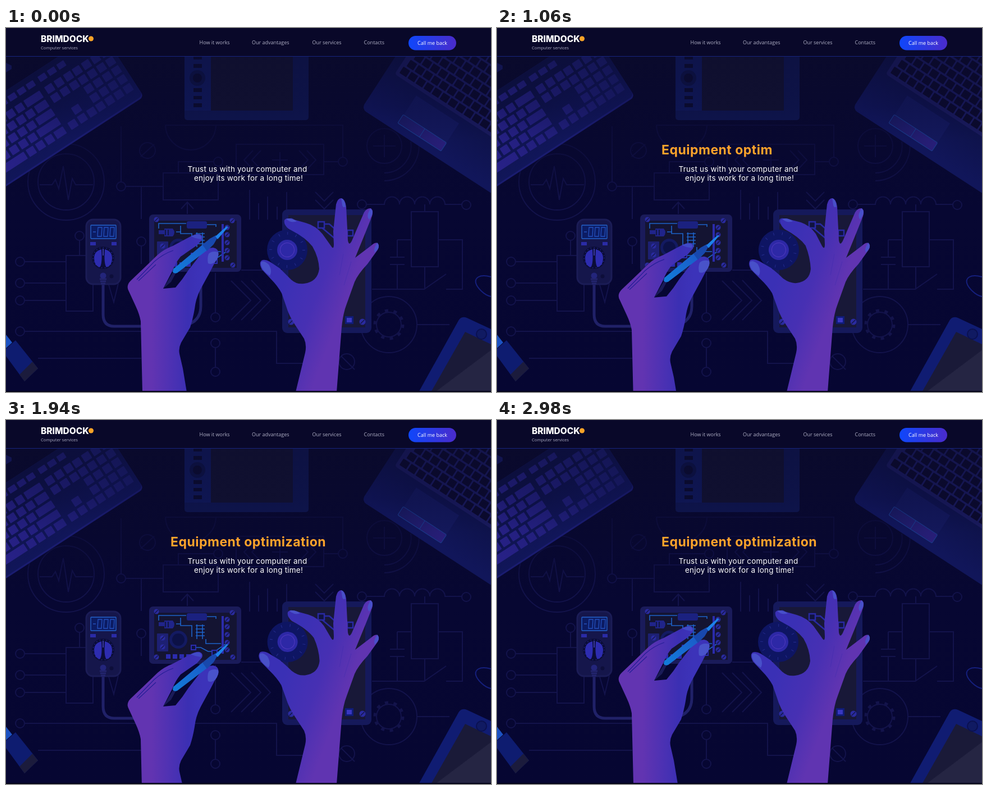
These frames come from a looping animation (864 px wide and 648 px high, 3 s). An HTML page:

```html
<!DOCTYPE html>
<html lang="en">
<head>
<meta charset="utf-8">
<title>Computer services</title>
<style>
html, body { margin: 0; width: 100%; height: 100%; overflow: hidden; background: #060632; }
svg { display: block; width: 864px; height: 648px; }
.nav { font: 9px "Open Sans", sans-serif; fill: #aeaec4; }
.head { font-family: Montserrat, Inter, sans-serif; fill: #fff; }
.line { fill: none; stroke: #13134b; stroke-width: 2; }
.wire { fill: none; stroke: #1d62c8; stroke-width: 1.6; }
</style>
</head>
<body>
<svg viewBox="0 0 864 648">
<defs>
  <linearGradient id="bg" x2="0" y2="1"><stop stop-color="#0a0a2c"/><stop offset=".5" stop-color="#070732"/><stop offset="1" stop-color="#060632"/></linearGradient>
  <linearGradient id="shade" x2="0" y2="1"><stop stop-color="#0a0a2c" stop-opacity=".85"/><stop offset=".6" stop-color="#08082f" stop-opacity=".55"/><stop offset="1" stop-color="#070732" stop-opacity="0"/></linearGradient>
  <linearGradient id="keys" gradientUnits="userSpaceOnUse" x1="0" y1="0" x2="-290" y2="0"><stop stop-color="#191c69"/><stop offset="1" stop-color="#282188"/></linearGradient>
  <linearGradient id="body" gradientUnits="userSpaceOnUse" x1="0" y1="-110" x2="0" y2="0"><stop stop-color="#0d1144"/><stop offset="1" stop-color="#11165a"/></linearGradient>
  <linearGradient id="bar"><stop stop-color="#191a60"/><stop offset="1" stop-color="#281e78"/></linearGradient>
  <linearGradient id="call"><stop stop-color="#0f47fb"/><stop offset="1" stop-color="#4a2bcb"/></linearGradient>
  <linearGradient id="skinL" gradientUnits="userSpaceOnUse" x1="220" y1="0" x2="350" y2="0"><stop offset=".3" stop-color="#6234b1"/><stop offset=".58" stop-color="#4c31b3"/><stop offset=".8" stop-color="#3b2fb3"/><stop offset="1" stop-color="#3c33b9"/></linearGradient>
  <linearGradient id="skinR" gradientUnits="userSpaceOnUse" x1="505" y1="425" x2="612" y2="465"><stop stop-color="#3a30b5"/><stop offset=".55" stop-color="#4730b3"/><stop offset="1" stop-color="#6034b1"/></linearGradient>
  <linearGradient id="pen" gradientUnits="userSpaceOnUse" x1="300" y1="433" x2="360" y2="385"><stop stop-color="#127bd9"/><stop offset="1" stop-color="#1b5ac8"/></linearGradient>
</defs>

<rect width="864" height="648" fill="url(#bg)"/>

<!-- circuit drawing -->
<g class="line">
  <circle cx="107" cy="274" r="68"/><circle cx="107" cy="274" r="50"/>
  <path d="M60 279H82L88 270 94 286 102 246 111 306 118 268 124 279H155"/>
  <path d="M205 274V175M213 282H280M241 283V340M241 388V420M280 258H378V306H280ZM307 258V238H370M241 218H242M240 229L264 207"/>
  <path d="M284 172A45 45 0 0 0 374 172M283 173H600V230M410 207H566V261H410ZM566 238H592"/>
  <path d="M440 218L424 235 440 252M454 218L438 235 454 252M522 218L538 235 522 252M536 218L552 235 536 252M474 235H502M488 221V249"/>
  <path d="M654 210H694M674 190V230M674 272A62 62 0 0 0 735 200M674 258A48 48 0 0 0 721 202"/>
  <path d="M33 416H107M33 454H107M33 485H107M131 378V405M107 405H155V504H107ZM178 440L192 488 200 455"/>
  <path d="M33 540H482V597H593M57 588H241M373 507V436M373 569V604M597 584L621 608M419 431H492"/>
  <path d="M401 450L436 485 401 520M419 450L454 485 419 520M437 449L471 485 437 520"/>
  <path d="M434 288V341M450 312V341M466 300V341M483 318V341M500 292V325M323 331V310M312 322L323 310 334 322"/>
  <path d="M551 292L567 308 583 292M551 306L567 322 583 306"/>
  <path d="M642 314H674a13 13 0 0 1 27 0a13 13 0 0 1 27 0a13 13 0 0 1 27 0a13 13 0 0 1 27 0H812"/>
  <path d="M722 327H770V425H722ZM746 314V327M746 425V465M684 408H710M684 421H710M697 377V408M697 421V465M697 377H722M652 465H745L784 438M784 465H813V377H770M732 528H790"/>
  <circle cx="682" cy="528" r="50"/><circle cx="682" cy="528" r="22"/>
  <circle cx="682" cy="528" r="25" stroke-width="5" stroke-dasharray="6 9.7"/>
  <g id="nodes"></g>
</g>
<rect y="50" width="864" height="270" fill="url(#shade)"/>
<path d="M864 443C842 437 835 446 837 454S852 476 864 478" fill="none" stroke="#151f7c" stroke-width="2"/>

<!-- keyboard -->
<path d="M0 62L10 67 10 73 0 79Z" fill="#15195f"/>
<g transform="translate(244 120) rotate(-33)">
  <rect x="-500" y="-140" width="500" height="143" rx="8" fill="#1a1c70"/>
  <rect x="-500" y="-140" width="500" height="140" rx="8" fill="url(#body)"/>
  <g id="keyboard" fill="url(#keys)"></g>
</g>

<!-- laptop -->
<g transform="translate(637 138) rotate(33)">
  <rect y="-240" width="420" height="247" rx="10" fill="url(#body)"/>
  <rect x="16" y="-250" width="380" height="173" rx="5" fill="#191a5c"/>
  <rect x="69" y="-66" width="91" height="41" fill="#13185a"/>
  <rect x="68" y="-25" width="92" height="18" rx="2" fill="url(#bar)" stroke="#193b8a"/>
  <path d="M114 -25V-7" stroke="#193b8a"/>
  <g id="laptop" fill="#0b0a2c"></g>
</g>

<!-- tablet -->
<rect x="318" y="40" width="221" height="124" rx="5" fill="#0f164e"/>
<rect x="318" y="40" width="47" height="107" fill="#10195a"/>
<rect x="365" y="40" width="146" height="107" fill="#121230"/>
<circle cx="341" cy="89" r="14" fill="#0d1345"/><circle cx="341" cy="89" r="8" fill="#0b0c30"/>
<path d="M334 50h15v6h-15zm0 14h15v7h-15zm0 43h15v7h-15zm0 14h15v6h-15zm0 13h15v7h-15z" fill="#0b0c2e"/>
<rect y="50" width="864" height="150" fill="url(#shade)" opacity=".4"/>

<!-- phone and memory stick -->
<path d="M733 652L806 521Q811 512 821 516L866 537V652Z" fill="#101c72"/>
<path d="M756 650L818 541 866 564V650Z" fill="#1a1a38"/>
<path d="M762 650L866 572V650Z" fill="#252543"/>
<circle cx="847" cy="545" r="9" fill="#101a62" stroke="#0b1150" stroke-width="2"/>
<path d="M0 546L11 560 0 570Z" fill="#1c52c2"/>
<path d="M0 571L17 556 57 606 33 629 0 584Z" fill="#0e1c70"/>
<path d="M47 594L57 606 33 629 24 617Z" fill="#1b1b3c"/>

<!-- multimeter -->
<path d="M173 450V510Q173 531 193 531H300Q347 531 347 495V430" fill="none" stroke="#202168" stroke-width="5"/>
<rect x="143" y="341" width="61" height="115" rx="12" fill="#15164b" stroke="#1b1c56" stroke-width="3"/>
<rect x="151" y="351" width="45" height="24" rx="1" fill="#0c1c64" stroke="#2463cc" stroke-width="1.3"/>
<path d="M155 363H160" stroke="#2450bd" stroke-width="1.5"/>
<g id="digits" fill="none" stroke="#2450bd" stroke-width="1.3"></g>
<path d="M150 384H160M188 384H197" stroke="#2a2ba6" stroke-width="6"/>
<circle cx="173" cy="409" r="20" fill="#0b0d37"/>
<circle cx="173" cy="409" r="18" fill="none" stroke="#2c2da8" stroke-width="1.5" stroke-dasharray="1 5"/>
<path d="M170 394Q157 397 157 410T167 426Q172 420 170 394ZM176 394Q189 397 189 410T179 426Q174 420 176 394Z" fill="#2d2cb0"/>
<path d="M173 393V405" stroke="#4a49c8" stroke-width="1.500"/>
<circle cx="173" cy="441" r="5.5" fill="#23257b"/><circle cx="188" cy="442" r="3.5" fill="#0d0e3a"/>
<path d="M167 447H179M168 451H178M169 455H177" stroke="#23246e" stroke-width="3"/>

<!-- left board -->
<rect x="255" y="332" width="164" height="102" rx="7" fill="#1a1b5a"/>
<rect x="264" y="343" width="147" height="84" fill="#141432"/>
<g class="wire">
  <path d="M272 357V348H321M358 350H374V354M311 352V366H331V386M338 366H354M338 372H354M338 378H354M338 384H354M340 364V390M350 364V390"/>
  <path d="M338 405H347L360 412H372L394 397M303 363H312M356 390V398H383"/>
</g>
<rect x="322" y="344" width="36" height="13" rx="3" fill="#1b2180"/>
<path d="M272 360H282V357H297Q303 364 297 371H282V367H272Z" fill="#20248a"/>
<path d="M284 359V369M289 359V369" stroke="#111746" stroke-width="2"/>
<rect x="269" y="380" width="20" height="32" rx="1" fill="#1d2073"/>
<circle cx="307" cy="391" r="16" fill="#131a61"/><circle cx="307" cy="391" r="11" fill="#0c1146"/>
<path d="M285 421h8m4 0h8m4 0h8m4 0h8" stroke="#2b2bae" stroke-width="8"/>
<path d="M386 349V416" stroke="#2b2bab" stroke-width="4"/>
<rect x="330" y="401" width="8" height="8" fill="#0e1340" stroke="#2b2bae" stroke-width="2"/>
<rect x="367" y="410" width="9" height="9" fill="#0e1340" stroke="#2b2bae" stroke-width="2"/>

<!-- right board -->
<rect x="492" y="323" width="159" height="220" rx="9" fill="#15195b"/>
<path d="M503 333H640V533H503Z" fill="#181838"/>
<path d="M565 349H576L593 364H609M561 354L586 375" fill="none" stroke="#2829a3" stroke-width="2.5"/>
<path d="M556 345h11v11h-11zM608 360h10v10h-10z" fill="#10133f" stroke="#2829a3" stroke-width="2.5"/>
<rect x="604" y="513" width="15" height="14" fill="#101c78"/><rect x="607" y="516" width="9" height="8" fill="#3937c0"/>
<g id="screws"></g>

<g id="knob">
  <circle cx="501" cy="395" r="36" fill="#0e1563"/>
  <circle cx="501" cy="395" r="29.5" fill="none" stroke="#252c8f" stroke-width="5" stroke-dasharray="1 14.45"/>
  <circle cx="501" cy="395" r="18" fill="#2d28a6"/>
  <circle cx="501" cy="395" r="12.5" fill="none" stroke="#5039bd"/>
</g>

<!-- right hand -->
<path id="handR" fill="url(#skinR)"/>
<path d="M597 303Q604 305 605 318 600 321 599 315 598 308 597 303M649 321Q655 324 652 333L647 341Q643 337 645 330ZM661 382Q666 386 663 393L657 400Q655 394 658 388Z" fill="#4850c9"/>
<path id="nailR" fill="#4850c9"/>
<path d="M601 402L594 440M615 416L602 458" stroke="#3c2cae" opacity=".45" fill="none"/>

<!-- left hand -->
<g id="handL">
  <path fill="url(#skinL)" d="M243 700V648L240 522Q238 510 231 495L219 469Q213 459 222 450L243 430 270 404Q281 394 297 388L327 372Q338 366 345 367 352 370 349 377L340 387 311 407Q302 418 296 433L280 464 302 462Q315 447 325 431L346 404Q358 391 369 391 381 393 378 406L364 433 346 466Q338 482 336 500 333 518 328 533L312 560Q307 570 309 580L315 606 322 648 330 700Z"/>
  <path d="M233 448L264 416Q280 402 298 396M236 450L267 421" stroke="#251f98" stroke-width="1.3" fill="none"/>
  <path d="M280 464L298 434 306 430 294 452Z" fill="#1a1b58"/>
  <path d="M329 371Q340 366 345 368 350 371 347 376 338 375 329 371Z" fill="#404ac6"/>
  <path d="M361 402Q367 396 378 399 380 407 373 416 366 422 360 419 358 410 361 402Z" fill="#4953c9"/>
  <path d="M298 429L351 385 359 395 305 436Q299 438 297 434Z" fill="url(#pen)"/>
  <path d="M350 386L363 375 374 369 377 373 370 385 358 397Z" fill="#1848ad"/>
  <path d="M373 371L393 353 396 354 377 376Z" fill="#1d82e9"/>
</g>

<path d="M0 647H864" stroke="#030318" stroke-width="2"/>

<!-- header -->
<rect width="864" height="50" fill="#090829"/>
<path d="M0 50.5H864" stroke="#17247d"/>
<text class="head" x="62" y="24.5" font-size="15.5" font-weight="800">BRIMDOCK</text>
<circle cx="151.5" cy="19" r="4.5" fill="#f9a328"/>
<g class="nav">
  <text x="62" y="37.5" font-size="7.6">Computer services</text>
  <text x="344.5" y="28.5">How it works</text>
  <text x="438" y="28.5">Our advantages</text>
  <text x="545.5" y="28.5">Our services</text>
  <text x="637.5" y="28.5">Contacts</text>
</g>
<rect x="717" y="14" width="85" height="25.5" rx="12.75" fill="url(#call)"/>
<text class="nav" x="759.5" y="30" text-anchor="middle" style="fill:#fff">Call me back</text>

<text class="head" id="title" x="293" y="225" font-size="23" font-weight="700" letter-spacing=".48" style="fill:#ffa32b"></text>
<g class="head" font-size="13.5" letter-spacing=".2" text-anchor="middle">
  <text x="430" y="255.5">Trust us with your computer and</text>
  <text x="432" y="271.5">enjoy its work for a long time!</text>
</g>
</svg>

<script>
const $ = id => document.getElementById(id);
const put = (id, parts) => { $(id).innerHTML = parts.join(""); };
const key = (x, y, w = 15, h = 14.5) =>
  `<rect x="${x}" y="${y}" width="${w}" height="${h}" rx="1"/>`;
const ring = ([x, y, r = 8]) => `<circle cx="${x}" cy="${y}" r="${r}"/>`;
const screw = ([x, y, r = 4.5]) =>
  `<circle cx="${x}" cy="${y}" r="${r}" fill="#2a2b9f"/>` +
  `<path d="M${x - r * .6} ${y + r * .6}L${x + r * .6} ${y - r * .6}" stroke="#121444" stroke-width="1.3"/>`;

put("nodes", [[205, 282], [241, 380], [131, 370], [25, 416], [25, 454], [25, 485], [25, 540],
  [373, 515], [373, 561], [373, 612], [378, 238], [600, 238], [634, 314], [820, 315],
  [252, 218, 14], [674, 210, 31], [607, 594, 14]].map(ring));

put("screws", [[268, 341], [403, 343], [268, 422], [404, 422], [279, 388], [279, 404],
  ...[355, 368, 382, 396, 409].map(y => [394, y]),
  [508, 523, 5.5], [635, 523, 5.5], [508, 344, 5.5]].map(screw));

put("digits", [163, 174, 185].map(x => `<path d="M${x + 1} 355H${x + 8}L${x + 7} 371H${x}Z"/>`));

// keyboard: number pad, arrows, navigation block, letters
const keys = [];
for (let row = 0; row < 5; row++) {
  const y = -32 - row * 19;
  for (let col = 0; col < 4; col++) keys.push(key(-23 - col * 19.5, y));
  for (let col = 0; col < 3; col++)
    if (row === 0 || row > 2 || (row === 1 && col === 1)) keys.push(key(-100 - col * 20, y));
  let x = -150;
  for (let i = 0; x > -420; i++) {
    const wide = i === 0 ? [20, 44, 34, 24, 34][row] : row === 0 && i === 4 ? 100 : 15;
    x -= wide;
    keys.push(key(x, y, wide));
    x -= 4.5;
  }
}
for (let x = -165; x > -420; x -= 19.5) keys.push(key(x, -130, 15, 11));
for (let i = 0; i < 3; i++) keys.push(key(-100 - i * 20, -130, 15, 11));
put("keyboard", keys);

const caps = [];
for (let row = 0; row < 9; row++)
  for (let x = 22 + (row % 3) * 4; x < 380; x += 17)
    caps.push(key(x, -97 - row * 17, 14, 13.5));
put("laptop", caps);

const TITLE = "Equipment optimization";
const span = (t, a, b) => Math.min(1, Math.max(0, (t - a) / (b - a)));
const easeIn = x => x * x;
const easeOut = x => 1 - (1 - x) ** 2;
const easeInOut = x => x * x / (x * x + (1 - x) ** 2);

// q: 0 is the resting pinch, 1 the turned knob
function drawPinch(q) {
  const p = (x, y, dx = 0, dy = 0) => `${x + dx * q} ${y + dy * q} `;
  $("handR").setAttribute("d",
    "M516 648L533 578Q536 564 531 553L514 527Q504 512 " + p(499, 495, -.5) +
    "L" + p(491, 472, -1) + "Q" + p(484, 459, -2) + p(471, 446, -3) +
    "L" + p(456, 430, -4) + "Q" + p(450, 419, -4) + p(455, 414, -4, -1) +
    p(461, 411, -4, -1) + p(470, 416, -3, -1) +
    "L" + p(488, 428, 0, -1) + "Q" + p(498, 438, 3, -1) + p(507, 447, 3, -1) +
    p(517, 457, 6, -2) + p(531, 455, 3, -1) +
    "Q" + p(555, 452, 2, -1) + p(558, 429, 1) + p(557, 408, 1) + p(546, 389, 4, -2) +
    "Q" + p(533, 372, 6) + p(504, 358, 9) +
    "Q" + p(494, 350, 10) + p(496, 342, 10) + p(499, 337, 10) + p(509, 340, 10) +
    "L" + p(534, 347, 8, -1) + "Q" + p(552, 352, 5, -1) + p(564, 367, 4, -1) +
    "L579 388Q584 396 584 385L583 362 588 314Q591 303 597 303 604 304 606 318L608 358 609 378Q611 389 616 379L638 328Q643 320 650 321 655 325 652 335L640 365 622 409 651 387Q657 381 662 383 666 387 662 395L644 420Q627 438 621 452L607 491Q599 511 597 545L589 648Z");
  $("nailR").setAttribute("d",
    "M" + p(454, 418, -4) + "Q" + p(457, 412, -4, -1) + p(468, 421, -4, -1) +
    p(475, 432, -4) + p(470, 441, -4) + p(454, 431, -4) + p(454, 418, -4) + "Z" +
    "M" + p(499, 340, 10) + "Q" + p(508, 337, 10) + p(518, 344, 10) +
    p(508, 348, 10) + p(499, 340, 10) + "Z");
  $("knob").setAttribute("transform", `translate(${q} 0) rotate(${12 * q} 501 395)`);
}

function frame() {
  const t = performance.now() % 3000;
  $("title").textContent = TITLE.slice(0, Math.floor(t / 68));
  const drop = t < 2200
    ? 15.5 * easeInOut(span(t, 0, 700)) + 30.5 * easeIn(span(t, 1000, 1640))
    : 46 * (1 - easeInOut(span(t, 2200, 2980)));
  $("handL").setAttribute("transform", `translate(0 ${drop})`);
  drawPinch(t < 1640 ? easeOut(span(t, 0, 1500)) : 1 - easeOut(span(t, 1640, 2980)));
  requestAnimationFrame(frame);
}
frame();
</script>
</body>
</html>
```
